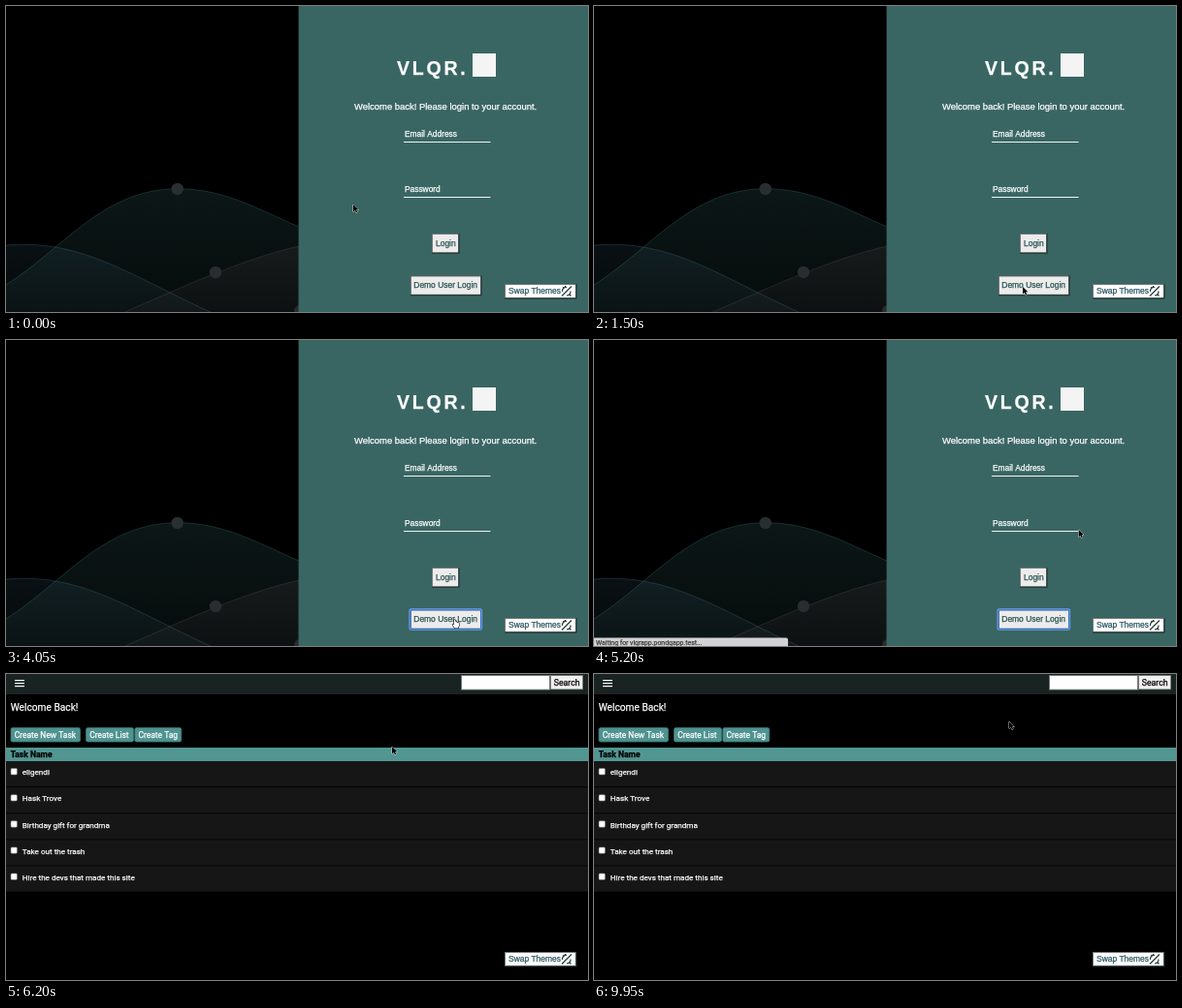
These frames come from a looping animation (600 by 316 pixels, 10 s). An HTML page with a canvas:

```html
<!DOCTYPE html>
<html lang="en">
<head>
<meta charset="utf-8">
<title>Task app login</title>
<style>
html, body { margin: 0; width: 100%; height: 100%; overflow: hidden; background: #000; }
canvas { display: block; width: 600px; height: 316px; }
</style>
</head>
<body>
<canvas id="stage"></canvas>
<script>
const W = 600, H = 316, LOOP = 10000, STEP = 50;
const canvas = document.getElementById('stage');
const ctx = canvas.getContext('2d');
const dpr = window.devicePixelRatio || 1;
canvas.width = W * dpr;
canvas.height = H * dpr;

const ARIAL = '"Liberation Sans", Arial, sans-serif';
const UI = 'Roboto, Inter, sans-serif';
const TEAL = '#396663', INK = '#28524f';

// Pointer stops: time, x, y
const path = [
  [0, 358, 205], [150, 358, 205], [650, 432, 281], [850, 432, 281],
  [1250, 442, 290], [2800, 442, 290], [3500, 460.5, 288.5], [4350, 460.5, 288.5],
  [5200, 499.7, 196], [5750, 499.7, 196], [6200, 398, 75], [9850, 398, 75],
  [9950, 428, 49], [LOOP, 428, 49]
];

const clamp = v => Math.max(0, Math.min(1, v));
const ramp = (t, a, b) => clamp((t - a) / (b - a));
const ease = p => p * p * (3 - 2 * p);

function pointerAt(t) {
  const i = path.findIndex(k => k[0] > t);
  const [t0, x0, y0] = path[i - 1], [t1, x1, y1] = path[i];
  const p = ease(ramp(t, t0, t1));
  return [x0 + (x1 - x0) * p, y0 + (y1 - y0) * p];
}

function rect(x, y, w, h, color) {
  ctx.fillStyle = color;
  ctx.fillRect(x, y, w, h);
}

function round(x, y, w, h, r, fill, stroke, lw = 1) {
  ctx.beginPath();
  ctx.roundRect(x, y, w, h, r);
  if (fill) { ctx.fillStyle = fill; ctx.fill(); }
  if (stroke) { ctx.strokeStyle = stroke; ctx.lineWidth = lw; ctx.stroke(); }
}

// A hairline stroke gives the letters a slightly heavier weight
function text(str, x, y, size, color, family = ARIAL, weight = 400, spacing = 0) {
  ctx.font = `${weight} ${size}px ${family}`;
  ctx.letterSpacing = spacing + 'px';
  ctx.fillStyle = ctx.strokeStyle = color;
  ctx.lineWidth = 0.25;
  ctx.fillText(str, x, y);
  ctx.strokeText(str, x, y);
}

function dot(x, y, r, color) {
  ctx.fillStyle = color;
  ctx.beginPath();
  ctx.arc(x, y, r, 0, 7);
  ctx.fill();
}

// Curve given as SVG path data, filled down to the bottom edge
function wave(d, top, rgb, lineAlpha, fillAlpha) {
  const g = ctx.createLinearGradient(0, top, 0, H + 10);
  g.addColorStop(0, `rgba(${rgb},${fillAlpha})`);
  g.addColorStop(1, `rgba(${rgb},${fillAlpha * 0.45})`);
  ctx.fillStyle = g;
  ctx.fill(new Path2D(d + 'V320H0Z'));
  ctx.strokeStyle = `rgba(${rgb},${lineAlpha})`;
  ctx.lineWidth = 0.8;
  ctx.stroke(new Path2D(d));
}

function bevelButton(x, y, w, h, label, tx, ty) {
  rect(x, y, w, h, '#1c2b2a');
  rect(x, y, w - 1, h - 1, '#767676');
  rect(x + 1, y + 1, w - 2.5, h - 2.5, '#ececec');
  text(label, tx, ty, 8.45, INK);
}

function swapButton() {
  rect(514, 287, 74.5, 15.5, '#1b2a2a');
  rect(514, 287, 73.5, 14.5, '#767676');
  rect(515, 288, 72, 13, '#fff');
  text('Swap Themes', 518, 297.3, 8.45, '#2b5560');
  ctx.strokeStyle = '#263b3b';
  ctx.lineWidth = 1.2;
  ctx.stroke(new Path2D('M573 299.5L583 289.5M573.5 295A4 4 0 0 1 578 290.5M578 299A4 4 0 0 0 582 294.5M574 290.5l1 1M573 293h1.3M576.5 289v1.3M581 298l1.5 1.5'));
}

function loginPage(focused) {
  rect(0, 0, 302, H, '#000');
  ctx.save();
  ctx.beginPath();
  ctx.rect(0, 0, 302, H);
  ctx.clip();
  wave('M0 288C60 250 100 188.7 177 188.7C225 188.7 260 210 302 228', 189, '65,125,125', 0.4, 0.18);
  wave('M0 247C80 240 130 280 215 318', 246, '70,118,138', 0.4, 0.14);
  wave('M118 318C170 296 240 262 302 248V320', 248, '120,95,105', 0.32, 0.12);
  dot(176.7, 189, 6.2, '#292e2f');
  dot(216, 275, 6.2, '#2a2d2f');
  dot(303, 315, 6, '#2b2b2e');
  ctx.restore();

  rect(301.6, 0, W - 301.6, H, TEAL);
  text('VLQR.', 403, 71, 19.5, '#fff', ARIAL, 700, 2.8);
  rect(481, 49, 24, 24, '#f4f4f4');
  text('Welcome back! Please login to your account.', 359, 107.2, 9.45, '#fff');
  [['Email Address', 140], ['Password', 197]].forEach(([label, y]) => {
    text(label, 411, y - 4.6, 8.4, '#fff');
    rect(410, y, 89.5, 1, '#f2f5f5');
  });
  bevelButton(439, 235, 28.5, 20.7, 'Login', 443, 247.8);
  bevelButton(417, 278.5, 73.5, 20.7, 'Demo User Login', 420.3, 291.4);
  if (focused) {
    round(416.3, 278.2, 74, 20.8, 1.5, null, '#6ea2e8', 1.7);
    round(416.9, 278.8, 72.8, 19.6, 1, null, '#2a6fd6', 0.9);
  }
  swapButton();
}

function dashboard() {
  rect(0, 0, W, H, '#000');
  rect(0, 0, W, 21, '#192322');
  [6, 9, 12].forEach(y => rect(9, y, 10, 1.2, '#fff'));
  rect(469, 1, 92, 15.7, '#767676');
  rect(470, 2, 90, 13.7, '#fff');
  rect(561, 1, 34, 15.2, '#767676');
  rect(562, 2, 32.2, 13.4, '#efefef');
  text('Search', 564.7, 12, 8.75, '#000', UI);
  text('Welcome Back!', 4.7, 37.6, 10.2, '#fff', UI);

  [['Create New Task', 5, 71.5], ['Create List', 82.5, 49], ['Create Tag', 132.8, 48]]
    .forEach(([label, x, w]) => {
      round(x, 55.6, w, 14.4, 1.8, '#4f9390', '#3b7572', 0.8);
      text(label, x + 3.7, 66.2, 8.45, '#fff', UI);
    });

  rect(0, 76, W, 14, '#529692');
  text('Task Name', 4.7, 86.2, 8.55, '#000', UI, 700);

  ['eligendi', 'Hask Trove', 'Birthday gift for grandma', 'Take out the trash',
    'Hire the devs that made this site'].forEach((label, i) => {
    const y = 90 + i * 27.1;
    rect(0, y, W, 26.3, '#161616');
    round(5, y + 7.6, 6.4, 6.4, 1, '#fff', '#777', 0.6);
    text(label, 16.8, y + 14.3, 8.1, '#fff', UI);
  });
  swapButton();
}

function statusBar(alpha) {
  ctx.globalAlpha = alpha;
  round(-2, 307.4, 202, 12, 2, '#d2d1d4');
  text('Waiting for vlqrapp.pondqapp.test...', 2, 314.5, 6.9, '#3c3c3c', UI);
  ctx.globalAlpha = 1;
}

const arrow = new Path2D('M0 0V8.2L1.9 6.5L3.2 9.3L4.6 8.7L3.4 5.9H5.9Z');
const hand = new Path2D('M1.5 5.2V1Q2.3-.4 3 1V3.4Q4-.1 4.6 3.6Q5.5 2.9 6 4Q7.2 3.5 7.2 5V7L6.3 10H2.5L0 6.6Q-.2 5 1.5 6Z');

function pointer(x, y, isHand) {
  ctx.save();
  ctx.translate(x, y);
  ctx.scale(0.9, 0.9);
  ctx.lineJoin = 'round';
  const shape = isHand ? hand : arrow;
  ctx.strokeStyle = isHand ? '#000' : '#e4e4e4';
  ctx.lineWidth = isHand ? 1.3 : 1;
  ctx.stroke(shape);
  ctx.fillStyle = isHand ? '#fff' : '#000';
  ctx.fill(shape);
  ctx.restore();
}

function draw(now) {
  const t = Math.floor(now % LOOP / STEP) * STEP;
  ctx.setTransform(dpr, 0, 0, dpr, 0, 0);
  if (t < 5250) loginPage(t >= 3700);
  else dashboard();
  statusBar(ramp(t, 4200, 4350) * (1 - ramp(t, 5200, 5400)) ** 1.5);
  const [x, y] = pointerAt(t);
  pointer(x, y, t >= 2850 && t < 5250 && y > 277 && x < 491);
  requestAnimationFrame(draw);
}
requestAnimationFrame(draw);
</script>
</body>
</html>
```
